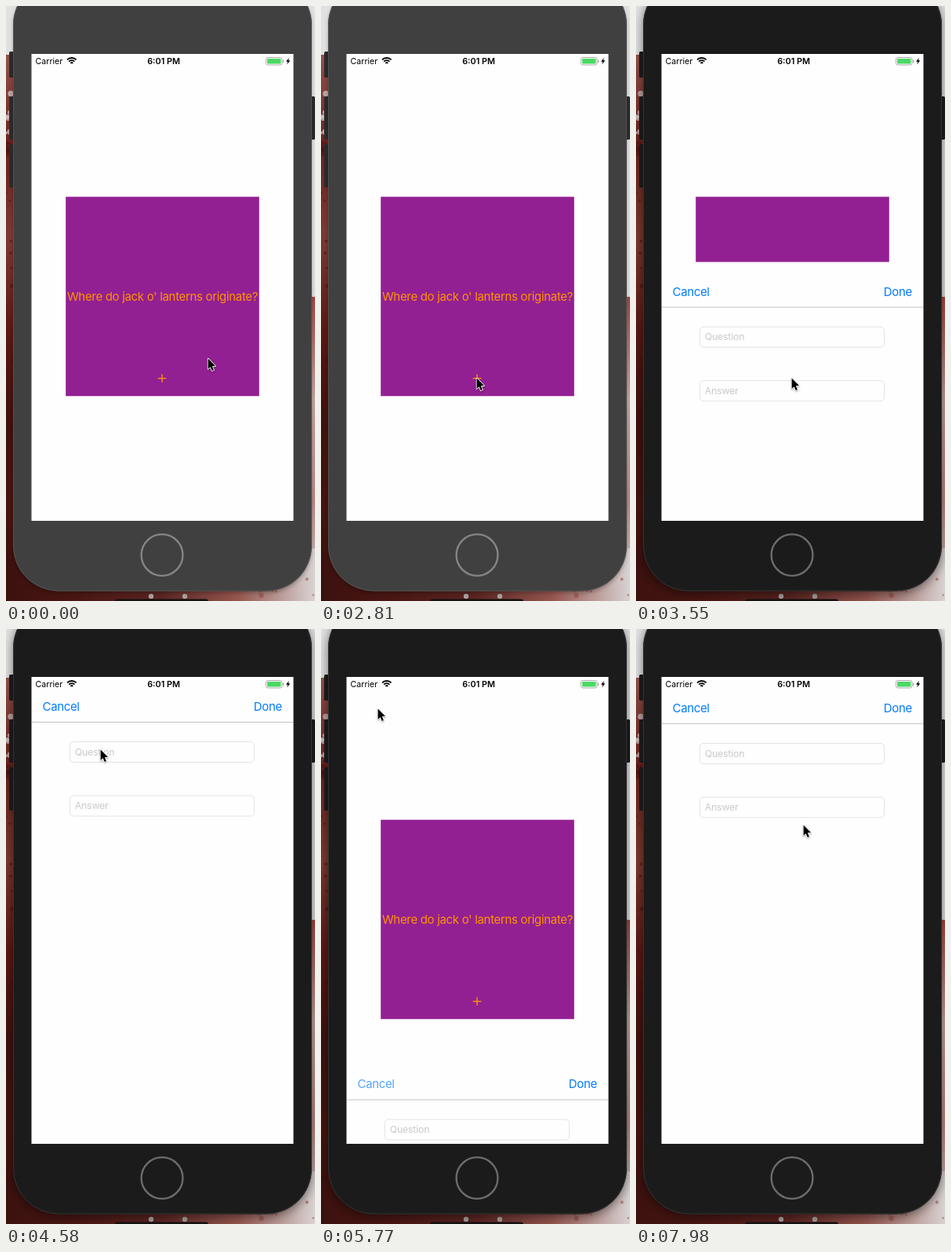
Animation of 394 by 757 pixels, one loop 8000 ms. Source, as an HTML page with a canvas:

```html
<!DOCTYPE html>
<html lang="en">
<head>
<meta charset="utf-8">
<title>Flashcard app</title>
<style>
html, body { margin: 0; width: 394px; height: 757px; overflow: hidden; background: #ddd; }
canvas { display: block; width: 394px; height: 757px; }
</style>
</head>
<body>
<canvas id="stage"></canvas>
<script>
const W = 394, H = 757, LOOP = 8000;
const FIRST = 1200, TICK = 147.3;
const LEFT = 32.5, TOP = 61, WIDTH = 334, BOTTOM = 655;
const FONT = 'Inter, Roboto, sans-serif';
const BLUE = '#007aff', ORANGE = '#ff9300';
const canvas = document.getElementById('stage');
const ctx = canvas.getContext('2d');
const dpr = window.devicePixelRatio || 1;
canvas.width = W * dpr;
canvas.height = H * dpr;

// Pointer moves: start tick, end tick, x, y
const moves = [
  [-1, 0, 257, 452],
  [3, 5, 267, 463],
  [5, 11, 198, 473],
  [17, 22, 120, 153],
  [23, 28, 72, 101],
  [32, 39, 202, 473],
  [39, 41, 195, 474],
  [43, 46, 213, 249]
];

const clamp = v => Math.min(1, Math.max(0, v));
const smooth = p => p * p * (3 - 2 * p);

function pointerAt(k) {
  let x = 257, y = 448;
  for (const [from, to, toX, toY] of moves) {
    const p = smooth(clamp((k - from) / (to - from)));
    x += (toX - x) * p;
    y += (toY - y) * p;
  }
  return [x, y];
}

// Critically damped spring, 0 to 1
function spring(ms) {
  const x = 18.26 * Math.max(0, ms) / 1000;
  return 1 - (1 + x) * Math.exp(-x);
}

function sheetTop(t) {
  const open = spring(t - 3455) - spring(t - 5599) + spring(t - 7543);
  return BOTTOM - (BOTTOM - TOP) * open;
}

// Opacity of a button: dim while held, then fading back
function touch(t, press, release) {
  return t < press ? 1 : 0.25 + 0.75 * clamp((t - release) / 300);
}

function rng(seed) {
  return () => (seed = (seed * 16807) % 2147483647) / 2147483647;
}

function rect(x, y, w, h, color) {
  ctx.fillStyle = color;
  ctx.fillRect(x, y, w, h);
}

function round(x, y, w, h, r, color) {
  ctx.beginPath();
  ctx.roundRect(x, y, w, h, r);
  if (color) {
    ctx.fillStyle = color;
    ctx.fill();
  } else ctx.stroke();
}

function dot(x, y, r, color) {
  ctx.fillStyle = color;
  ctx.beginPath();
  ctx.arc(x, y, r, 0, 7);
  ctx.fill();
}

function arc(x, y, r, from = 0, to = 7) {
  ctx.beginPath();
  ctx.arc(x, y, r, from, to);
  ctx.stroke();
}

function shape(points) {
  ctx.beginPath();
  points.forEach(([x, y]) => ctx.lineTo(x, y));
  ctx.closePath();
}

function text(s, x, y, size, color, { weight = 400, align = 'left', gap = 0 } = {}) {
  ctx.font = `${weight} ${size}px ${FONT}`;
  ctx.letterSpacing = gap + 'px';
  ctx.textAlign = align;
  ctx.fillStyle = color;
  ctx.fillText(s, x, y);
}

function faded(alpha, paint) {
  ctx.globalAlpha = alpha;
  paint();
  ctx.globalAlpha = 1;
}

// Rectangle filled with evenly spaced colours, downwards or across
function blend(x, y, w, h, down, colors) {
  const g = ctx.createLinearGradient(x, y, down ? x : x + w, down ? y + h : y);
  colors.forEach((c, i) => g.addColorStop(i / (colors.length - 1), c));
  rect(x, y, w, h, g);
}

function splats(seed, count, x, y, w, h, color) {
  const rand = rng(seed);
  for (let i = 0; i < count; i++)
    dot(x + rand() * w, y + rand() * h, 1 + rand() * 3, color);
}

function wallpaper() {
  rect(0, 0, W, H, '#e2e1e2');
  blend(0, 62, 60, H - 62, true,
    ['#94524c', '#6a211c', '#7d3a32', '#5c1813', '#40110e', '#47140f', '#35100d']);
  blend(330, 370, 64, H - 370, true, ['#a4483f', '#c4a6a2', '#b98a86', '#d4cfcf']);
  blend(0, 690, W, 67, false, ['#3c110e', '#4b1713', '#5a2521', '#96564f', '#d8d3d2']);
  splats(7, 10, 0, 60, 9, 110, '#dcd6d6aa');
  splats(77, 24, 0, 170, 9, 530, '#4a130f88');
  splats(31, 24, 300, 690, 94, 67, '#96433b88');
  dot(185, 751, 3.2, '#a9a2a0');
  dot(228, 751, 3.2, '#a9a2a0');
  round(139, 754.5, 119, 10, 3, '#171212');
}

function phone(active) {
  const button = (x, y, h) => round(x, y, 8, h, 1.5, active ? '#1d1d1f' : '#2c2c2d');
  button(4, 58, 33);
  for (const [x, y] of [[4, 115], [4, 176], [386, 115]]) button(x, y, 55);

  ctx.save();
  ctx.shadowColor = `rgba(0,0,0,${active ? 0.5 : 0.25})`;
  ctx.shadowBlur = (active ? 14 : 5) * dpr;
  ctx.shadowOffsetY = 3 * dpr;
  round(9, -34, 381, 778.5, 58, active ? '#1b1b1b' : '#404040');
  ctx.restore();

  ctx.lineWidth = 1;
  ctx.strokeStyle = active ? '#343434' : '#535353';
  round(9.5, -33.5, 380, 777.5, 57.5);
  ctx.lineWidth = 2.4;
  ctx.strokeStyle = active ? '#6c6c6c' : '#858585';
  arc(199, 698.5, 26.4);
  rect(LEFT, TOP, WIDTH, BOTTOM - TOP, '#fefefe');
}

function card(plusAlpha) {
  rect(76.2, 242.7, 246.6, 253.6, '#932092');
  text("Where do jack o' lanterns originate?", 199.5, 375, 15, ORANGE,
    { align: 'center', gap: -0.32 });
  faded(plusAlpha, () => {
    rect(193.8, 473, 10.4, 1.4, ORANGE);
    rect(198.3, 468.5, 1.4, 10.4, ORANGE);
  });
}

function field(label, y) {
  ctx.lineWidth = 1;
  ctx.strokeStyle = '#e4e4e4';
  round(81.5, y + 0.5, 235, 26, 4.5);
  text(label, 87.7, y + 17.6, 12.3, '#c9c9cd', { gap: -0.18 });
}

function sheet(y, cancelAlpha) {
  ctx.save();
  ctx.beginPath();
  ctx.rect(33, TOP, 333, BOTTOM - TOP);
  ctx.clip();
  rect(33, y, 333, BOTTOM - TOP, '#fefefe');
  rect(33, y + 57, 333, 1, '#c4c4c6');
  faded(cancelAlpha, () => text('Cancel', 46.6, y + 43, 15, BLUE, { gap: -0.36 }));
  text('Done', 315.8, y + 43, 15, BLUE, { gap: -0.36 });
  field('Question', y + 82);
  field('Answer', y + 150.5);
  ctx.restore();
}

function statusBar() {
  text('Carrier', 37.6, 74, 10.6, '#000');
  text('6:01 PM', 201, 74, 10.8, '#000', { weight: 600, align: 'center' });

  ctx.strokeStyle = '#000';
  ctx.lineWidth = 1.8;
  for (let r = 2; r < 9; r += 3.1) arc(83.8, 74.2, r, -Math.PI * 0.75, -Math.PI * 0.25);

  ctx.lineWidth = 0.9;
  ctx.strokeStyle = '#a3a3a3';
  round(331.5, 65.5, 20.5, 9.5, 2.4);
  round(333, 67, 17.5, 6.5, 1, '#4cd964');
  rect(353, 68.7, 1.2, 3.2, '#a3a3a3');
  shape([[361, 65.8], [357, 70.7], [359.3, 70.7], [358.2, 74.4], [362.3, 69.3], [360, 69.3]]);
  ctx.fillStyle = '#000';
  ctx.fill();
}

function arrow(x, y) {
  ctx.save();
  ctx.translate(x + 0.6, y + 0.6);
  ctx.scale(0.95, 0.95);
  shape([[0, 0], [0, 14], [3.2, 11.1], [5.4, 16.3], [7.7, 15.3], [5.5, 10.2], [9.9, 10]]);
  ctx.shadowColor = 'rgba(0,0,0,.35)';
  ctx.shadowBlur = 2 * dpr;
  ctx.shadowOffsetY = dpr;
  ctx.lineWidth = 1.8;
  ctx.lineJoin = 'round';
  ctx.strokeStyle = '#fff';
  ctx.stroke();
  ctx.shadowColor = 'transparent';
  ctx.fillStyle = '#000';
  ctx.fill();
  ctx.restore();
}

function draw(now) {
  // The screen refreshes in even ticks after an opening hold
  const k = Math.max(-1, Math.floor((now - FIRST + 11) / TICK));
  const t = FIRST + k * TICK;
  const top = sheetTop(t);
  const plus = t < 5000 ? touch(t, 3400, 3455) : touch(t, 7380, 7543);

  ctx.setTransform(dpr, 0, 0, dpr, 0, 0);
  wallpaper();
  phone(t > 3400);
  card(plus);
  if (top < BOTTOM - 0.5) sheet(top, touch(t, 5450, 5599));
  statusBar();
  arrow(...pointerAt(k));
}

function frame() {
  draw(performance.now() % LOOP);
  requestAnimationFrame(frame);
}
frame();
</script>
</body>
</html>
```
